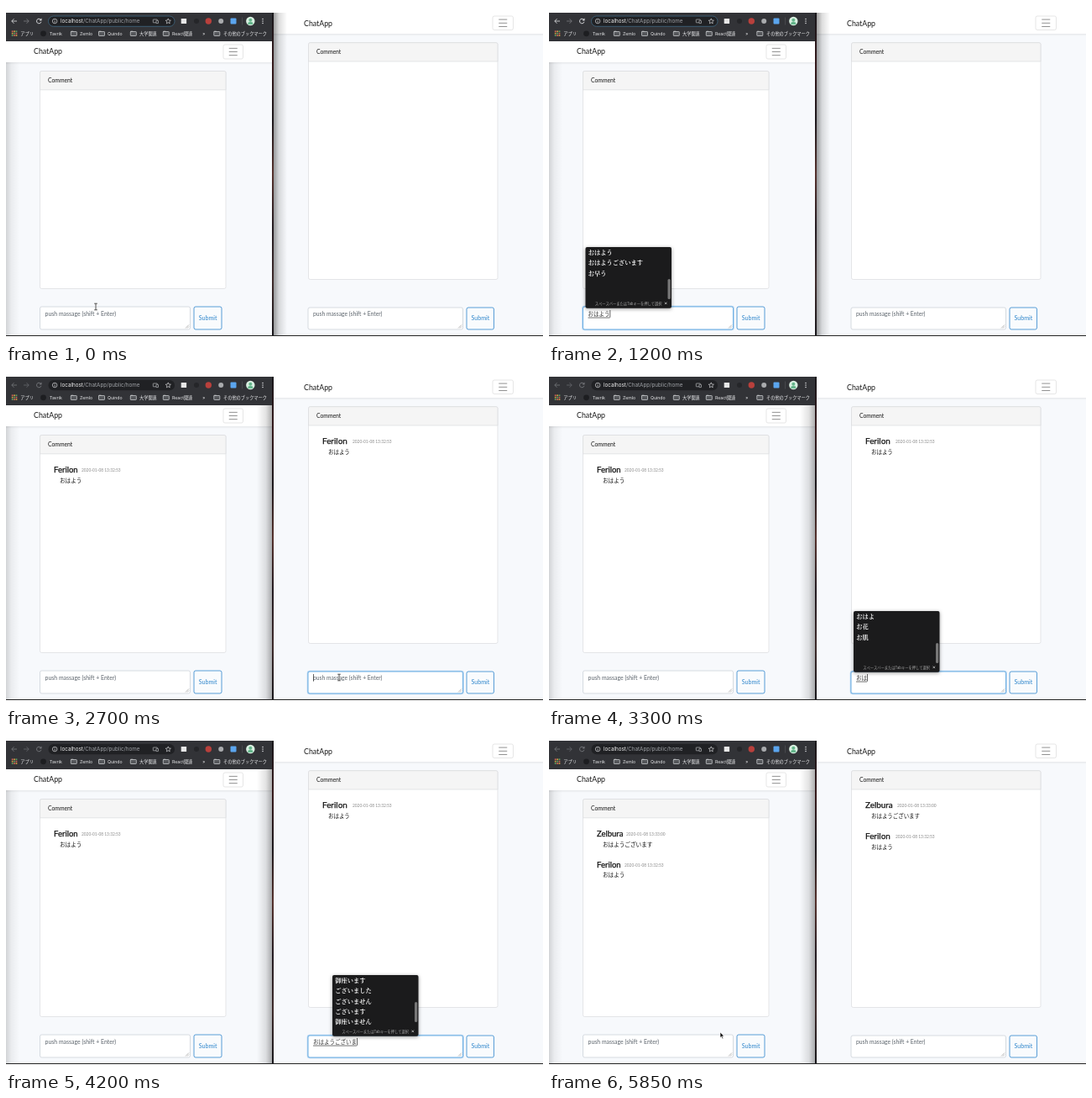
Animation of 640 by 400 pixels, one loop 6000 ms. Source, as an HTML page with a canvas:

```html
<!DOCTYPE html>
<html lang="ja">
<head>
<meta charset="utf-8">
<title>ChatApp</title>
<style>
html, body { margin: 0; width: 100%; height: 100%; overflow: hidden; background: #fff; }
canvas { display: block; width: 640px; height: 400px; }
</style>
</head>
<body>
<canvas id="stage"></canvas>
<script>
const canvas = document.getElementById('stage');
const ctx = canvas.getContext('2d');
const ratio = window.devicePixelRatio || 1;
canvas.width = 640 * ratio;
canvas.height = 400 * ratio;

const LOOP = 6000, STEP = 150;
const PAGE = 'Lato, "Noto Sans CJK JP", sans-serif';
const UI = 'Inter, "Noto Sans CJK JP", sans-serif';
const SERIF = '"Noto Serif CJK JP", "Noto Sans CJK JP", serif';
const BLUE = '#2f86cc';

const LEFT = {
  nav: [0, 42, 317, 25], title: [33, 57], burger: [259, 46, 23.5, 17],
  card: [40.5, 77.5, 221.5, 259], box: [40.5, 358, 179, 27], button: [224, 358, 33, 27],
  hint: 6.95, kana: 6.6, name: 9.5
};
const RIGHT = {
  nav: [319, 8, 321, 25], title: [355, 23.5], burger: [580, 12, 24.5, 16.5],
  card: [360.5, 43.7, 225.5, 281.8], box: [360, 359, 184.5, 26], button: [549, 359, 32.5, 26],
  hint: 6.75, kana: 6.45, name: 9.9
};

const FIRST = { name: 'Ferilon', date: '2020-01-08 13:32:53', body: 'おはよう', dateX: 49.5 };
const REPLY = { name: 'Zelbura', date: '2020-01-08 13:33:00', body: 'おはようございます', dateX: 51.5 };

// [time, typed text, composing]; null means the field has no focus
const LEFT_INPUT = [
  [0, null], [450, ''], [600, 'お', true], [900, 'おは', true], [1050, 'おはよ', true],
  [1200, 'おはよう', true], [1350, 'おはよう'], [1500, null]
];
const RIGHT_INPUT = [
  [0, null], [2250, ''], [3000, 'お', true], [3300, 'おは', true], [3450, 'おはよ', true],
  [3600, 'おはよう', true], [3750, 'おはようご', true], [3900, 'おはようござ', true],
  [4050, 'おはようござい', true], [4200, 'おはようございま', true],
  [4350, 'おはようございます', true], [4500, 'おはようございます'], [4650, null]
];

// [time, x, y, shape]
const POINTER = [
  [0, 107, 358, 'beam'], [300, 98, 365, 'beam'], [450, 98, 366, 'beam'], [600, 0, 0, ''],
  [1650, 310, 362, 'arrow'], [1800, 424, 358, 'arrow'], [1950, 406, 364, 'beam'],
  [2100, 397, 366, 'beam'], [2850, 397, 366, 'beam'], [3000, 0, 0, ''],
  [5100, 397, 366, 'beam'], [5400, 385, 365, 'beam'], [5550, 310, 361, 'arrow'],
  [5700, 235, 356, 'arrow'], [5850, 204, 355, 'arrow'], [6000, 107, 358, 'beam']
];

function rect(x, y, w, h, color) {
  ctx.fillStyle = color;
  ctx.fillRect(x, y, w, h);
}

function box(x, y, w, h, r, fill, stroke, line = 0.7) {
  ctx.beginPath();
  ctx.roundRect(x, y, w, h, r);
  if (fill) { ctx.fillStyle = fill; ctx.fill(); }
  if (stroke) { ctx.strokeStyle = stroke; ctx.lineWidth = line; ctx.stroke(); }
}

function circle(x, y, r, color) {
  ctx.beginPath();
  ctx.arc(x, y, r, 0, Math.PI * 2);
  ctx.fillStyle = color;
  ctx.fill();
}

function path(points, color, width = 0.8, fill) {
  ctx.beginPath();
  points.forEach(([x, y], i) => i ? ctx.lineTo(x, y) : ctx.moveTo(x, y));
  if (fill) { ctx.closePath(); ctx.fillStyle = fill; ctx.fill(); }
  ctx.strokeStyle = color;
  ctx.lineWidth = width;
  ctx.stroke();
}

function text(str, x, y, size, color, family = PAGE, weight = 400) {
  ctx.font = `${weight} ${size}px ${family}`;
  ctx.fillStyle = color;
  ctx.fillText(str, x, y);
  return ctx.measureText(str).width;
}

function fade(x0, x1, y, alpha) {
  const g = ctx.createLinearGradient(x0, 0, x1, 0);
  g.addColorStop(0, `rgba(0,0,0,${alpha})`);
  g.addColorStop(0.4, `rgba(0,0,0,${alpha * 0.35})`);
  g.addColorStop(1, 'rgba(0,0,0,0)');
  rect(Math.min(x0, x1), y, Math.abs(x1 - x0), 392 - y, g);
}

const latest = (keys, t) => keys.filter(k => k[0] <= t).pop();

function drawBurger([x, y, w, h]) {
  box(x, y, w, h, 2, null, '#dcdcdc');
  for (const dy of [-4.2, 0, 4.2]) {
    rect(x + w / 2 - 5, y + h / 2 + dy - 0.4, 10, 0.8, '#777');
  }
}

function drawPost(pane, post, row) {
  const x = pane.card[0], y = pane.card[1] + row * 36.8;
  ctx.strokeStyle = '#111';
  ctx.lineWidth = 0.25;
  text(post.name, x + 16.5, y + 44.3, pane.name, '#111');
  ctx.strokeText(post.name, x + 16.5, y + 44.3);
  text(post.date, x + post.dateX + (pane === RIGHT ? 3 : 0), y + 43.6, 4.85, '#888');
  text(post.body, x + 23.5, y + 56, pane.kana, '#111');
}

function drawInput(pane, [, value, composing]) {
  const [x, y, w, h] = pane.box, focused = value !== null, tx = x + 6, base = 368.7;
  if (focused) box(x, y, w, h, 2, null, 'rgba(52,144,220,.35)', 2.6);
  box(x, y, w, h, 2, '#fff', focused ? '#62a9e0' : '#ccd2d8', focused ? 0.9 : 0.8);
  for (const d of [2, 4]) {
    path([[x + w - 1.5 - d, y + h - 1.5], [x + w - 1.5, y + h - 1.5 - d]], '#777', 0.5);
  }
  if (!value) text('push massage (shift + Enter)', tx, base, pane.hint, '#5c646c');
  if (!focused) return;
  const width = value ? text(value, tx, base, 6.5, '#333') : 0;
  if (composing) rect(tx, 370.7, width, 0.7, '#333');
  rect(tx + width, 362, 0.7, 8.7, '#222');
}

function drawPane(pane, posts, input) {
  const [nx, ny, nw, nh] = pane.nav, [cx, cy, cw, ch] = pane.card, [bx, by, bw, bh] = pane.button;
  rect(nx, ny, nw, 392 - ny, '#f7f9fc');
  for (let i = 0; i < 3; i++) rect(nx, ny + nh + i * 0.8, nw, 0.8, `rgba(0,0,0,${0.06 - i * 0.018})`);
  rect(nx, ny, nw, nh, '#fff');
  text('ChatApp', ...pane.title, 8.8, '#161616');
  drawBurger(pane.burger);
  box(cx, cy, cw, ch, 2, '#fff', '#dadcde');
  box(cx, cy, cw, 22.3, [2, 2, 0, 0], '#f5f5f5', '#dadcde');
  text('Comment', cx + 9.5, cy + 13.5, 6.8, '#161616');
  posts.forEach((post, i) => drawPost(pane, post, i));
  drawInput(pane, input);
  box(bx, by, bw, bh, 2, '#f9fbfd', BLUE, 0.8);
  text('Submit', bx + bw / 2 - 10.8, 374, 7.1, BLUE);
}

function drawFolder(x) {
  box(x, 29.7, 3.2, 2, 0.5, '#c6c8cb');
  box(x, 30.5, 7, 5, 0.6, '#55575b', '#c6c8cb', 0.8);
}

function drawToolbar(active) {
  const icon = active ? '#e4e5e7' : '#77797d';
  rect(0, 8, 317, 34, '#323337');
  path([[9.5, 15.2], [6.8, 18], [9.5, 20.8]], icon);
  path([[6.8, 18], [13, 18]], icon);
  const dim = active ? '#7b7d81' : '#66686c';
  path([[24.5, 15.2], [27.2, 18], [24.5, 20.8]], dim);
  path([[21, 18], [27.2, 18]], dim);
  ctx.beginPath();
  ctx.arc(39.3, 18, 2.8, 0.3, 5.4);
  ctx.strokeStyle = icon;
  ctx.lineWidth = 0.9;
  ctx.stroke();
  path([[42.3, 14.8], [42.3, 17.3], [39.8, 17.3]], icon, 0.3, icon);

  box(50.5, 12, 150.5, 12.3, 6.1, '#202124', active ? '#426a85' : null, 0.8);
  box(55.3, 15.2, 5.6, 5.6, 2.8, null, '#d4d5d7');
  rect(57.7, 17.6, 0.8, 2, '#d4d5d7');
  rect(57.7, 16.3, 0.8, 0.7, '#d4d5d7');
  const host = text('localhost', 65, 20.3, 6.3, '#f1f1f1', UI);
  text('/ChatApp/public/home', 65 + host, 20.3, 6.3, '#a0a3a8', UI);
  box(175.3, 16, 5, 3.8, 0.4, null, '#b8babd');
  box(179, 17.3, 2.5, 3.3, 0.3, '#202124', '#b8babd');
  const star = Array.from({ length: 11 }, (_, i) => {
    const a = i * Math.PI / 5 - Math.PI / 2, r = i % 2 ? 1.5 : 3.3;
    return [193.3 + r * Math.cos(a), 18.2 + r * Math.sin(a)];
  });
  path(star, '#d4d5d7', 0.7);

  box(208.7, 15, 6.4, 6, 0.5, '#e8e8e8');
  circle(227, 18, 3, '#252629');
  circle(241.3, 18, 3.7, '#b9403c');
  circle(256.2, 18, 3, '#a9abad');
  box(267.5, 14.5, 7, 7, 1, '#5ba5ee');
  rect(281, 13.5, 0.6, 9, '#55575b');
  circle(291.3, 18, 5.2, '#d9f0e1');
  circle(291.3, 16.8, 2, '#63b58a');
  box(288.2, 19, 6.2, 3, [2, 2, 1, 1], '#63b58a');
  for (const y of [15.4, 18, 20.6]) circle(306, y, 0.75, '#e4e5e7');

  const hues = ['#d7655a', '#d5a344', '#62a565'];
  for (let i = 0; i < 9; i++) {
    rect(6.8 + (i % 3) * 2.4, 29.4 + Math.floor(i / 3) * 2.4, 1.7, 1.7, hues[(i + Math.floor(i / 3)) % 3]);
  }
  circle(44.5, 32.8, 3.4, '#1d1e21');
  [77.3, 110.5, 148.3, 187.3, 247.8].forEach(drawFolder);
  const marks = [['アプリ', 17.3], ['Tavrik', 52], ['Zemlo', 88], ['Quindo', 121],
    ['大学関連', 159], ['React関連', 198], ['»', 234.3], ['その他のブックマーク', 259]];
  for (const [label, x] of marks) text(label, x, 34.8, 5.2, '#e9eaec', UI);
}

function candidates(value) {
  const tail = value.slice(4);
  if (!tail) {
    if (value === 'おは') return ['おはよ', 'お花', 'お肌'];
    return ['おはよう', 'おはようございます', 'お早う'];
  }
  return ['御座います', 'ございました', 'ございません', 'ございます', '御座いません'];
}

function drawPopup(pane, [, value, composing]) {
  if (!composing || value.length < 2) return;
  const long = value.length > 4, x = pane.box[0] + 3 + (long ? 26 : 0), y = 287;
  ctx.save();
  ctx.shadowColor = 'rgba(0,0,0,.4)';
  ctx.shadowBlur = 4 * ratio;
  ctx.shadowOffsetY = ratio;
  box(x, y, 102.5, 72.8, 2, '#1b1b1c');
  ctx.restore();
  candidates(value).forEach((word, i) => {
    text(word, x + 3.3, y + 8.8 + i * 12.4, 7.25, '#f4f4f4', SERIF, 600);
  });
  box(x + 98, y + (long ? 32 : 38), 3.2, 24, 1.6, '#777');
  text('スペースバーまたはTabキーを押して選択', x + 11.3, y + 68.7, 4.25, '#a5a5a5', UI);
  path([[x + 94.5, y + 65.6], [x + 97, y + 68.1]], '#ccc', 0.8);
  path([[x + 97, y + 65.6], [x + 94.5, y + 68.1]], '#ccc', 0.8);
}

function drawPointer(t) {
  const i = POINTER.findLastIndex(k => k[0] <= t);
  const [t0, x0, y0, shape] = POINTER[i], [t1, x1, y1, next] = POINTER[i + 1];
  if (!shape) return;
  const k = next ? (t - t0) / (t1 - t0) : 0;
  const x = x0 + (x1 - x0) * k, y = y0 + (y1 - y0) * k;
  if (shape === 'beam') {
    for (const [color, width] of [['rgba(255,255,255,.8)', 1.8], ['#222', 0.8]]) {
      path([[x, y - 3.6], [x, y + 3.6]], color, width);
      path([[x - 1.8, y - 3.8], [x + 1.8, y - 3.8]], color, width);
      path([[x - 1.8, y + 3.8], [x + 1.8, y + 3.8]], color, width);
    }
  } else {
    const tip = [[0, 0], [0, 6.5], [1.5, 5.2], [2.6, 7.7], [3.7, 7.2], [2.6, 4.8], [4.7, 4.7], [0, 0]];
    path(tip.map(([dx, dy]) => [x + dx, y + dy]), '#fff', 0.6, '#111');
  }
}

function drawDesktop() {
  const g = ctx.createLinearGradient(0, 8, 0, 392);
  ['#18171b', '#35181a', '#1b171b', '#54302b', '#221a20', '#3c2929', '#17161a']
    .forEach((color, i, all) => g.addColorStop(i / (all.length - 1), color));
  rect(317, 8, 2, 384, g);
}

function render(t) {
  ctx.setTransform(ratio, 0, 0, ratio, 0, 0);
  rect(0, 0, 640, 400, '#fff');
  const leftActive = t < 2250;
  const leftPosts = t < 1650 ? [] : t < 5400 ? [FIRST] : [REPLY, FIRST];
  const rightPosts = t < 2400 ? [] : t < 4950 ? [FIRST] : [REPLY, FIRST];
  const leftInput = latest(LEFT_INPUT, t), rightInput = latest(RIGHT_INPUT, t);

  drawPane(LEFT, leftPosts, leftInput);
  drawPane(RIGHT, rightPosts, rightInput);
  drawToolbar(leftActive);
  drawDesktop();
  fade(0, 16, 67, 0.15);
  if (leftActive) fade(319, 335, 8, 0.38);
  else fade(317, 299, 42, 0.32);
  if (t >= 1650 && t < 1950) box(0, 385, 105, 7, [0, 2, 0, 0], 'rgba(225,228,231,.6)');
  rect(0, 392, 640, 1, '#222');
  drawPopup(LEFT, leftInput);
  drawPopup(RIGHT, rightInput);
  drawPointer(t);
}

function tick() {
  const t = performance.now() % LOOP;
  render(Math.floor(t / STEP) * STEP);
  requestAnimationFrame(tick);
}
tick();
</script>
</body>
</html>
```
